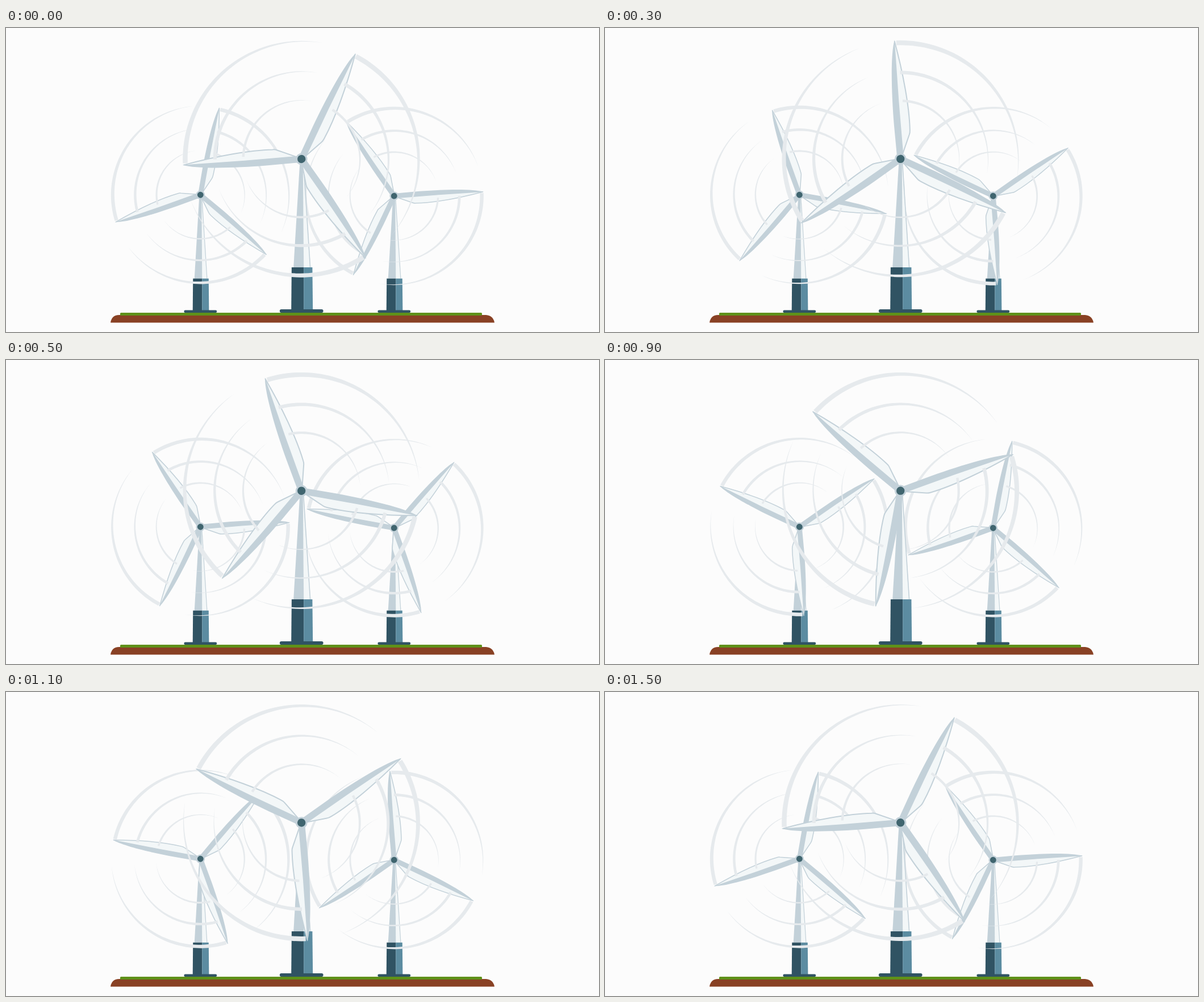
Write an HTML page that moves like this. It is 1044 px wide and 536 px high and loops after 1600 ms.

```html
<!DOCTYPE html>
<html lang="en">
<head>
<meta charset="utf-8">
<title>Wind turbines</title>
<style>
  html, body { margin: 0; width: 100%; height: 100%; overflow: hidden; background: #fcfcfc; }
  svg { display: block; width: 100%; height: 100%; }
  .steel { fill: #c3d1d9; }
  .panel { fill: #f3f7f8; }
  .edge { fill: none; stroke: #c3d1d9; stroke-width: 2; }
  .navy { fill: #305363; }
  .blue { fill: #5c8ca1; }
  .trail { fill: #e6eaed; }
</style>
</head>
<body>
<svg viewBox="0 0 1044 536">
  <defs>
    <g id="blade">
      <path class="panel" d="M8 0L8 4.5L42 18Q45 19.5 50 19.5C90 20.5 150 12.5 209 -1Z"/>
      <path class="edge" d="M8 4L42 17.5Q45 19 50 19C90 20 150 12 208 -.8"/>
      <path class="steel" d="M6 -6L60 -8.5C120 -10.5 185 -9 210 -.5L100 2L6 5.5Z"/>
    </g>
  </defs>
  <path fill="#894124" d="M184 519.5Q186 506 199 506H845Q858 507 860 519.5Z"/>
  <rect x="201" y="502" width="637" height="5" rx="1.5" fill="#5f9119"/>
  <g id="farm"></g>
</svg>
<script>
const GROUND = 502, LOOP = 1600, STEP = 200, TURN = 15;
const TRAILS = [ // outer radius, width, start angle
  [209, 8.5, 0.6],
  [155.5, 6.2, 2.4],
  [104.7, 4.4, 4.8]
];
const TURBINES = [ // hub, scale, start angle, upward drift per step
  { x: 342.3, y: 294.2, size: 0.754, angle: 77.6, drift: 0 },
  { x: 683.3, y: 296.2, size: 0.754, angle: 2.5, drift: 0 },
  { x: 520.2, y: 231, size: 1, angle: 62.7, drift: 0.09 }
];

// A band with a fixed outer edge that narrows to nothing behind the blade.
function trail([radius, width, from], to = 103, n = 50) {
  const outer = [], inner = [];
  for (let i = 0; i <= n; i++) {
    const k = i / n, a = (from + (to - from) * k) * Math.PI / 180;
    const taper = width * (1 - k ** 1.5);
    const at = r => `${(r * Math.cos(a)).toFixed(2)} ${(r * Math.sin(a)).toFixed(2)}`;
    outer.push(at(radius - 0.9 * k));
    inner.unshift(at(radius - 0.9 * k - taper));
  }
  return `<path class="trail" d="M${outer.concat(inner).join('L')}Z"/>`;
}

function tower({ x, y, size }) {
  const h = (y - GROUND) / size;
  return `<g transform="translate(${x} ${GROUND}) scale(${size})">
    <path class="panel" d="M2 ${h}H3L16 -80H4Z"/>
    <path class="edge" style="stroke-width:1.6" d="M3 ${h}L15.4 -80"/>
    <path class="steel" d="M-2.5 ${h}H2.5L4 -80H-14Z"/>
    <path class="navy" d="M-17.3 -80H4V-4H-18Z"/>
    <path class="blue" d="M4 -80H19.2L20 -4H4Z"/>
    <rect class="navy" x="-38.4" y="-6" width="76.8" height="6" rx="3"/>
  </g>`;
}

const trails = TRAILS.map(t => trail(t)).join('');
const spokes = inner => [0, 120, 240].map(a => `<g transform="rotate(${a})">${inner}</g>`).join('');
const rotor = spokes('<use href="#blade"/>') + spokes(trails) +
  '<circle class="steel" r="10.3"/><circle r="7.2" fill="#40656f"/>';

const farm = document.getElementById('farm');
farm.innerHTML = TURBINES.map(t => `${tower(t)}<g class="rotor">${rotor}</g>`).join('');
const rotors = farm.querySelectorAll('.rotor');

function draw(now) {
  const step = Math.floor((now % LOOP + STEP / 2) / STEP);
  TURBINES.forEach((t, i) => {
    const y = t.y - t.drift * step;
    rotors[i].setAttribute('transform',
      `translate(${t.x} ${y}) scale(${t.size}) rotate(${-t.angle - TURN * step})`);
  });
}

let start;
function tick(now) {
  start ??= now;
  draw(now - start);
  requestAnimationFrame(tick);
}
draw(0);
requestAnimationFrame(tick);
</script>
</body>
</html>
```
